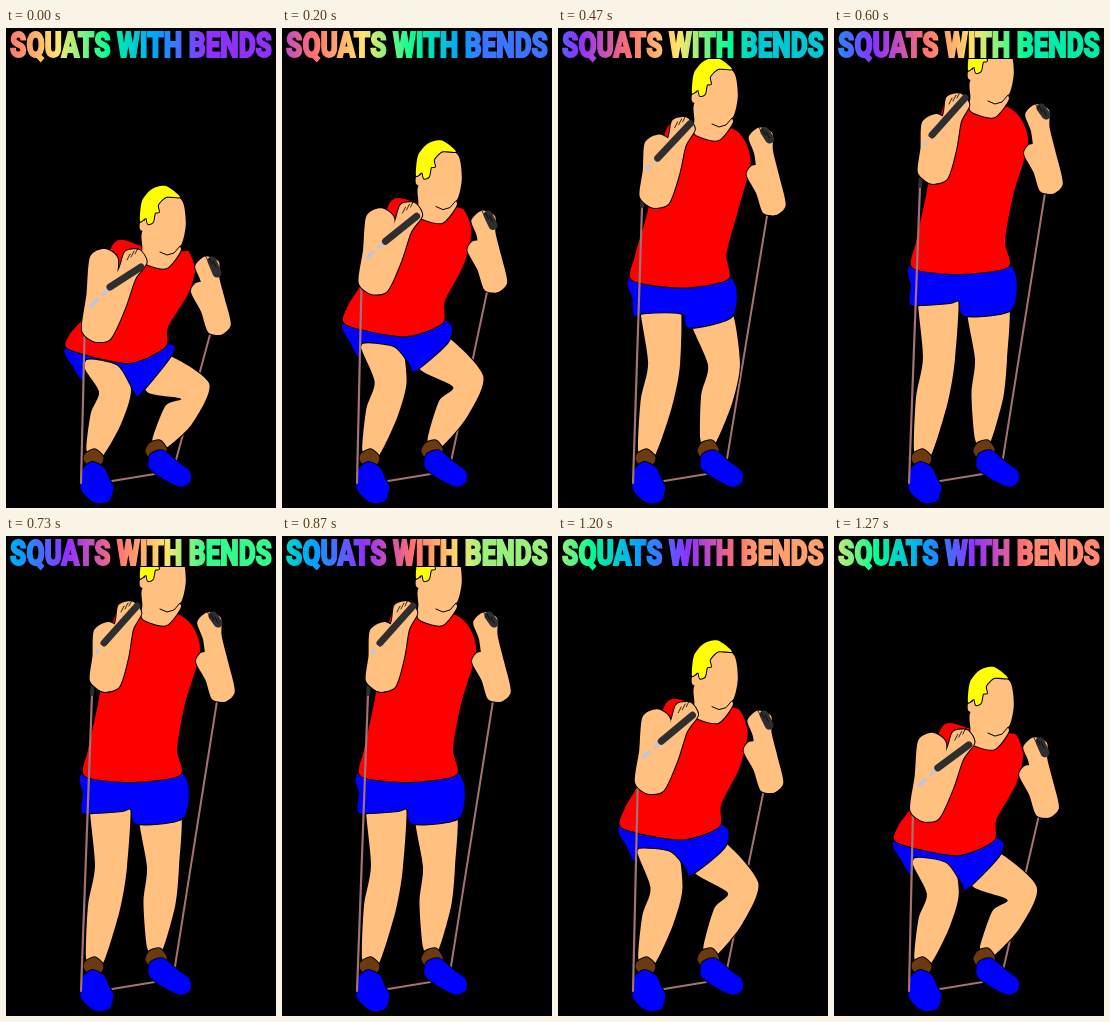
These frames come from a looping animation (270x480 px, 1330 ms). An HTML page with a canvas:

```html
<!DOCTYPE html>
<html lang="en">
<head>
<meta charset="utf-8">
<title>Squats with bends</title>
<style>
  html, body { margin: 0; width: 100%; height: 100%; overflow: hidden; background: #000; }
  canvas { display: block; }
</style>
</head>
<body>
<canvas width="270" height="480"></canvas>
<script>
const ctx = document.querySelector('canvas').getContext('2d');
const LOOP = 1330, STEP = 1000 / 15;
const SKIN = '#ffc080', RED = '#f00', BLUE = '#00f', YELLOW = '#ff0';
const BROWN = '#6b3a10', GRIP = '#2e2e30', BAND = '#a37272', METAL = '#c4c4d4';
const RAINBOW = ['#ff7070', '#ffe66a', '#00ff94', '#00a2ff', '#9030ff'];

let lift = 0; // 0 squatting, 1 standing

const mix = (a, b, k) => a + (b - a) * k;
const between = (p, q, k, r) => [mix(p[0], q[0], k), mix(p[1], q[1], k), r];

// A joint travels from its squatting to its standing place; the sideways move comes late
const joint = (x0, y0, x1, y1, r) => [mix(x0, x1, lift * lift), mix(y0, y1, lift), r];

function ease(t) {
  t = Math.min(1, Math.max(0, t));
  return (t + (1 - Math.cos(Math.PI * t)) / 2) / 2;
}

// Smooth closed curve through all points
function blob(points) {
  const path = new Path2D(), n = points.length, k = .13;
  const at = i => points[(i + n) % n];
  path.moveTo(...points[0]);
  for (let i = 0; i < n; i++) {
    const [a, b, c, d] = [at(i - 1), at(i), at(i + 1), at(i + 2)];
    path.bezierCurveTo(b[0] + (c[0] - a[0]) * k, b[1] + (c[1] - a[1]) * k,
                       c[0] - (d[0] - b[0]) * k, c[1] - (d[1] - b[1]) * k, c[0], c[1]);
  }
  path.closePath();
  return path;
}

// Rounded outline around a chain of [x, y, radius] nodes
function limb(...nodes) {
  const left = [], right = [], tips = [], last = nodes.length - 1;
  nodes.forEach(([x, y, r], i) => {
    const p = nodes[Math.max(0, i - 1)], q = nodes[Math.min(last, i + 1)];
    const len = Math.hypot(q[0] - p[0], q[1] - p[1]);
    const dx = (q[0] - p[0]) / len * r, dy = (q[1] - p[1]) / len * r;
    left.push([x + dy, y - dx]);
    right.unshift([x - dy, y + dx]);
    if (i === 0) tips[0] = [x - dx * .65, y - dy * .65];
    if (i === last) tips[1] = [x + dx * .65, y + dy * .65];
  });
  return blob([tips[0], ...left, tips[1], ...right]);
}

// Paths given together share one outline
function paint(color, ...paths) {
  ctx.strokeStyle = '#000';
  ctx.lineWidth = 2;
  paths.forEach(path => ctx.stroke(path));
  ctx.fillStyle = color;
  paths.forEach(path => ctx.fill(path));
}

function line(color, width, ...points) {
  ctx.beginPath();
  points.forEach(([x, y]) => ctx.lineTo(x, y));
  ctx.strokeStyle = color;
  ctx.lineWidth = width;
  ctx.stroke();
}

function leg(hip, knee, ankle) {
  paint(SKIN, limb(hip, knee, between(knee, ankle, .45, 16), ankle));
}

function arm(shoulder, elbow, hand) {
  const upper = limb(shoulder, between(shoulder, elbow, .5, shoulder[2]), elbow);
  const lower = limb(elbow, between(elbow, hand, .4, elbow[2] - 1), between(elbow, hand, .76, 9.5), hand);
  paint(SKIN, upper, lower);
}

function fingers([x, y], side) {
  for (let i = 0; i < 3; i++) {
    const fx = x + side * (i * 4 - 2), fy = y - 9 + i * 3;
    line('#000', .8, [fx, fy], [fx + side * 3, fy + 6]);
  }
}

function drawLegs() {
  leg(joint(150, 345, 154, 276, 21), joint(189, 363, 157, 331, 16), joint(153, 416, 149, 412, 8));
  paint(BROWN, limb([152, 418, 9], [149, 427, 10]));
  paint(BLUE, limb([150, 431, 11], [164, 442, 11], [179, 451, 9]));

  leg(joint(97, 331, 104, 262, 20), joint(109, 363, 105, 330, 16), [89, 424, 9]);
  paint(BROWN, limb([88, 427, 9], [87, 434, 9]));
  paint(BLUE, limb([87, 441, 11], [89, 456, 15], [98, 467, 12]));
}

function drawClothes() {
  paint(BLUE, blob([
    joint(63, 318, 80, 236), joint(68, 340, 77, 258), joint(77, 352, 76, 276),
    joint(80, 331, 88, 277), joint(112, 337, 116, 275),
    joint(128, 363, 125, 273), joint(134, 366, 131, 288),
    joint(166, 326, 178, 281), joint(159, 316, 174, 236)]));
  paint(RED, blob([
    joint(136, 218, 133, 74), joint(108, 215, 109, 80), joint(82, 283, 92, 168),
    joint(64, 306, 82, 214), joint(63, 321, 79, 240), joint(122, 335, 125, 246),
    joint(159, 319, 174, 239), joint(162, 299, 171, 213), joint(182, 266, 179, 168),
    joint(189, 242, 194, 116), joint(183, 224, 187, 91), joint(176, 223, 171, 78)]));
}

function drawHead() {
  ctx.save();
  ctx.translate(0, mix(158, 7, lift));
  const neck = limb([150, 44, 14], [152, 58, 16], [156, 70, 20]);
  const face = limb([158, 16, 18], [160, 40, 20], [164, 60, 12]);
  const ear = limb([138, 37, 4], [138, 43, 4]);
  paint(SKIN, neck, face, ear);
  line('#000', 1, [174, 60], [168, 67], [161, 69], [154, 66]);
  paint(YELLOW, blob([
    [174, 11], [160, 0], [146, 3], [136, 15], [134, 35], [140, 32],
    [142, 38], [147, 36], [149, 27], [153, 26], [152, 19], [160, 11]]));
  ctx.restore();
}

function drawRightArm() {
  const hand = joint(201, 236, 203, 84, 12);
  arm(joint(193, 260, 198, 122, 9), joint(213, 299, 217, 158, 12), hand);
  line(GRIP, 9, joint(206, 233, 207, 80), joint(211, 245, 212, 87));
  fingers(hand, 1);
}

function drawLeftArm() {
  const hand = joint(130, 229, 124, 73, 12);
  const gripEnd = joint(104, 259, 98, 107), strap = joint(85, 278, 91, 116);
  const hook = joint(79, 290, 86, 158);
  line(BAND, 2.2, hook, [75, 455]);
  line(GRIP, 4, hook, joint(79, 282, 87, 147));
  arm(joint(98, 230, 102, 95, 14), joint(91, 304, 99, 146, 15), hand);
  line(METAL, 4, gripEnd, strap);
  line(GRIP, 7, joint(135, 239, 131, 70), gripEnd);
  line(SKIN, 5, between(gripEnd, strap, .5), between(gripEnd, strap, .55));
  fingers(hand, -1);
}

function drawTitle(step) {
  ctx.fillStyle = '#000';
  ctx.fillRect(0, 0, 270, 31);
  const rainbow = ctx.createLinearGradient(3, 0, 267, 0);
  const shift = 5 - step / 5, first = Math.floor(shift);
  for (let i = 0; i <= 20; i++) {
    // Blend neighbouring colours at evenly spaced places
    const pos = shift + i / 5, k = Math.floor(pos);
    const [a, b] = [RAINBOW[k % 5], RAINBOW[(k + 1) % 5]];
    rainbow.addColorStop(i / 20, `color-mix(in srgb, ${b} ${(pos - k) * 100}%, ${a})`);
  }
  ctx.font = '900 extra-condensed 35px Roboto, sans-serif';
  ctx.fillStyle = ctx.strokeStyle = rainbow;
  ctx.lineWidth = 1.8;
  ctx.lineJoin = 'miter';
  ctx.miterLimit = 2;
  ctx.fillText('SQUATS WITH BENDS', 4, 28.5, 262);
  ctx.strokeText('SQUATS WITH BENDS', 4, 28.5, 262);
}

function draw() {
  const step = Math.floor((performance.now() % LOOP + 3.5) / STEP) % 20;
  lift = ease(step / 8.8) - ease((step - 14) / 6.5);
  ctx.fillStyle = '#000';
  ctx.fillRect(0, 0, 270, 480);
  ctx.lineCap = ctx.lineJoin = 'round';

  line(BAND, 2, joint(205, 303, 211, 165), [167, 443], [100, 454]);
  drawLegs();
  drawClothes();
  drawHead();
  drawRightArm();
  drawLeftArm();
  drawTitle(step);
  requestAnimationFrame(draw);
}
draw();
</script>
</body>
</html>
```
